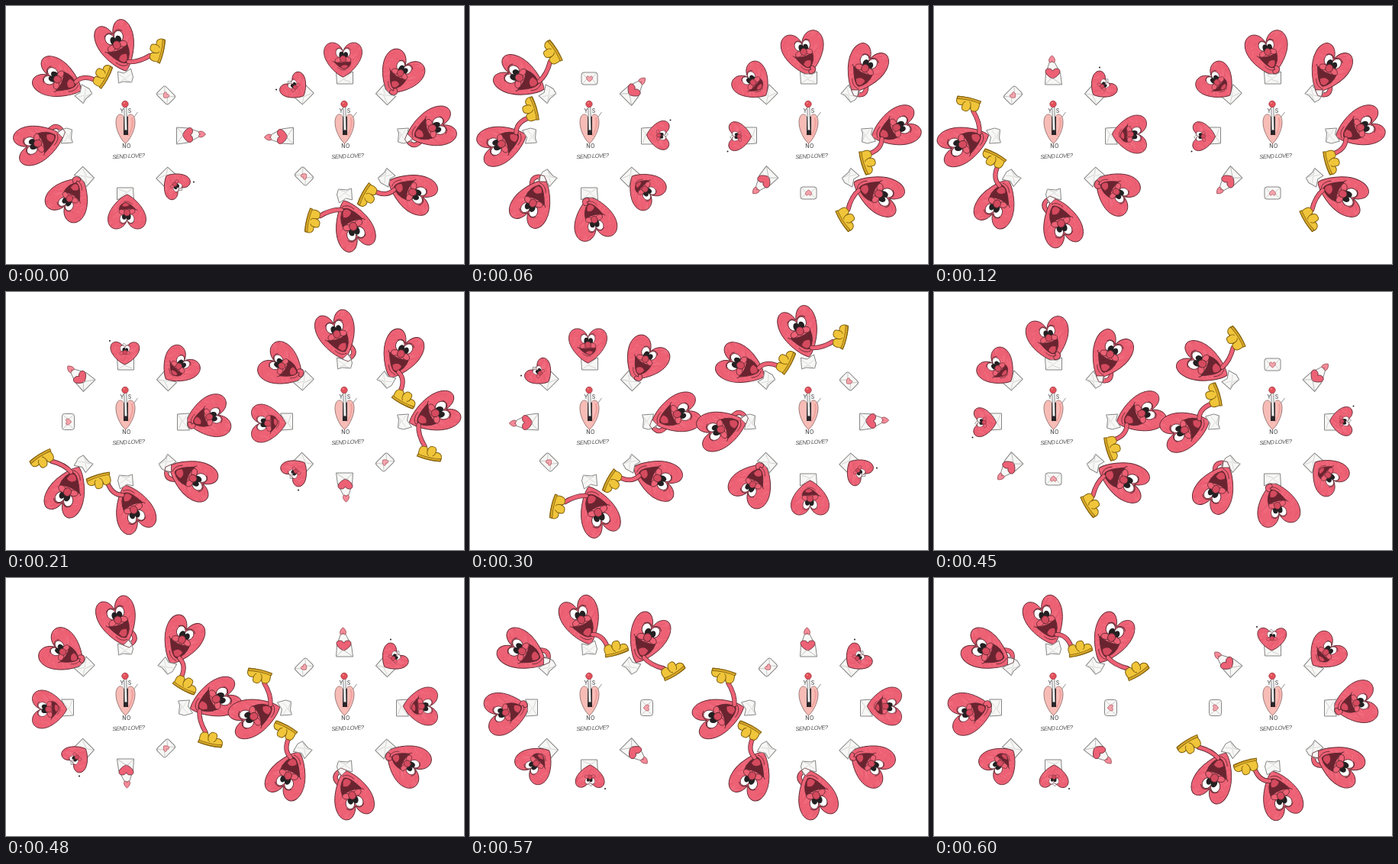
An HTML page with a canvas that plays this animation: 600 px wide and 338 px high, repeating every 630 ms.

```html
<!DOCTYPE html>
<html lang="en">
<head>
<meta charset="utf-8">
<title>Send love?</title>
<style>
html, body { margin: 0; width: 100%; height: 100%; overflow: hidden; background: #fff; }
canvas { display: block; width: 600px; height: 338px; }
</style>
</head>
<body>
<canvas id="stage" width="600" height="338"></canvas>
<script>
const ctx = document.getElementById('stage').getContext('2d');
const TAU = Math.PI * 2;
const FRAME = 30, LOOP = 630;
const INK = '#5f2932', RED = '#ed6175', DEEP = '#d44a5e', LIGHT = '#f88a98';
const GREY = '#858585', PAPER = '#f7f7f5', GOLD = '#80600f';

// Each disc turns back by one slot whenever its next start frame is reached.
const discs = [
  { x: 156.5, base: 0, starts: [1, 4, 7, 10, 13, 16, 19] },
  { x: 443.5, base: Math.PI, starts: [2, 5, 8, 10, 14, 16, 20] }
];

// Heart on each stage: tip, width, height, tilt in degrees, depth of the notch.
const hearts = {
  2: { x: -1, y: -75, w: 38, h: 30, tilt: 1, notch: .58 },
  3: { x: -2, y: -77, w: 50, h: 45, tilt: 0, notch: .74 },
  4: { x: 0, y: -80, w: 56, h: 56, tilt: -12, notch: .75 },
  5: { x: 0, y: -82, w: 51, h: 63, tilt: -17, notch: .77 },
  6: { x: 1, y: -83, w: 51, h: 63, tilt: -20, notch: .77 },
  7: { x: 1, y: -85, w: 50, h: 66, tilt: -20, notch: .77 }
};

function at(x, y, angle, draw) {
  ctx.save();
  ctx.translate(x, y);
  ctx.rotate(angle);
  draw();
  ctx.restore();
}

function paint(fill, stroke, width = 1) {
  if (fill) { ctx.fillStyle = fill; ctx.fill(); }
  if (stroke) { ctx.strokeStyle = stroke; ctx.lineWidth = width; ctx.stroke(); }
}

function poly(points, fill, stroke, width) {
  ctx.beginPath();
  points.forEach(([x, y]) => ctx.lineTo(x, y));
  ctx.closePath();
  paint(fill, stroke, width);
}

function line(points, stroke, width) {
  ctx.beginPath();
  points.forEach(([x, y]) => ctx.lineTo(x, y));
  paint(null, stroke, width);
}

function oval(x, y, rx, ry, fill, stroke, width, angle = 0) {
  ctx.beginPath();
  ctx.ellipse(x, y, rx, ry, angle, 0, TAU);
  paint(fill, stroke, width);
}

function curve(path, fill, stroke, width) {
  ctx.beginPath();
  ctx.moveTo(path[0], path[1]);
  for (let i = 2; i < path.length; i += 4) {
    ctx.quadraticCurveTo(path[i], path[i + 1], path[i + 2], path[i + 3]);
  }
  paint(fill, stroke, width);
}

function heartPath(w, h, notch = .76) {
  ctx.beginPath();
  ctx.moveTo(0, 0);
  ctx.bezierCurveTo(-.17 * w, -.07 * h, -.5 * w, -.42 * h, -.5 * w, -.72 * h);
  ctx.bezierCurveTo(-.5 * w, -1.08 * h, -.1 * w, -1.1 * h, 0, -notch * h);
  ctx.bezierCurveTo(.1 * w, -1.1 * h, .5 * w, -1.08 * h, .5 * w, -.72 * h);
  ctx.bezierCurveTo(.5 * w, -.42 * h, .17 * w, -.07 * h, 0, 0);
  ctx.closePath();
}

function plainHeart(x, y, w, h, angle, fill, stroke, width = .8) {
  at(x, y, angle, () => { heartPath(w, h); paint(fill, stroke, width); });
}

function crayon(w, h) {
  let seed = 7;
  const random = () => (seed = seed * 16807 % 2147483647) / 2147483647;
  ctx.save();
  ctx.clip();
  ctx.globalAlpha = .3;
  for (let i = 0; i < 50; i++) {
    const x = (random() - .5) * w, y = -random() * h;
    line([[x, y], [x + 3 + random() * 4, y - 3 - random() * 5]], i % 3 ? LIGHT : DEEP, 1.2);
  }
  ctx.restore();
}

function mouth(depth) {
  const y = part => -31 + part * depth;
  curve([-15, y(0), -2, y(.25), 13, y(-.05), 14, y(.6), 4, y(1), -4, y(1), -15, y(0)],
    '#6a2430', INK, 1);
  curve([-4, y(.65), 1, y(.3), 8, y(.5), 7, y(.9), 3, y(.92), -1, y(.95), -4, y(.65)], DEEP);
  curve([-18, y(-.1), -15, y(.08), -13, y(0)], null, INK, .9);
  curve([-9, y(.75), -4, y(1.2), 5, y(1.15)], null, INK, .8);
}

function face(stage, h) {
  const young = stage < 4;
  const scale = h / 66 * (young ? 1.15 : 1);
  ctx.save();
  ctx.translate(0, young ? h * .1 : 0);
  ctx.scale(scale, scale);
  if (stage > 2) mouth(young ? 12 : 21);
  oval(-6, -46, 6, 7.5, '#fff', INK, .9, -.2);
  oval(6, -46, 6, 7.5, '#fff', INK, .9, .2);
  oval(-2.5, -42.5, 4, 5.5, '#242022');
  oval(4.5, -42.5, 3.8, 5, '#242022');
  curve([-12, -51, -7, -57, -1, -52], null, INK, .9);
  curve([1, -52, 8, -58, 13, -51], null, INK, .9);
  oval(-8, -34, 5.5, 4, RED, INK, .8, -.3);
  oval(8, -35, 5.5, 4, RED, INK, .8, .3);
  oval(0, -36, 5, 5.5, DEEP, INK, .9);
  ctx.restore();
}

function character(stage) {
  const { x, y, w, h, tilt, notch } = hearts[stage];
  at(x, y, tilt * Math.PI / 180, () => {
    heartPath(w, h, notch);
    paint(RED);
    crayon(w, h);
    heartPath(w, h, notch);
    paint(null, INK, .9);
    face(stage, h);
  });
}

function limb(path) {
  ctx.lineCap = 'round';
  curve(path, null, INK, 6.2);
  curve(path, null, RED, 4.6);
  ctx.lineCap = 'butt';
}

function glove(x, y, angle) {
  at(x, y, angle, () => {
    curve([-14, 7, -17, -7, -9, -7, -4, -8, -4, -2, -3, -10, 3, -9,
      8, -9, 7, -2, 12, -4, 15, 0, 17, 4, 15, 8, 0, 10, -14, 7], '#f0c53a', GOLD, 1);
    curve([-16, 6, 0, 9, 16, 6], null, GOLD, 4);
    curve([-15, 6, 0, 8.5, 15, 6], null, '#d8a82a', 2.2);
    curve([-4, -2, -4, 3, -1, 4], null, GOLD, .9);
    curve([7, -2, 7, 2, 4, 3], null, GOLD, .9);
  });
}

function closedLetter() {
  ctx.beginPath();
  ctx.roundRect(-10.5, -83, 21, 16, 3);
  paint(PAPER, GREY);
  line([[-9, -68], [-3, -75], [-9, -82]], '#bbb', .7);
  line([[9, -68], [3, -75], [9, -82]], '#bbb', .7);
  plainHeart(0, -71, 8, 7, 0, '#f6a5ac', '#a95d66', .8);
}

function openingLetter() {
  poly([[-11, -67], [11, -67], [9, -82], [1, -97], [-5, -97], [-10, -82]], PAPER, GREY);
  line([[-10, -82], [-3, -75], [9, -82]], '#bbb', .7);
  plainHeart(-1, -75, 19, 13, 0, RED, INK);
  line([[-11, -67], [-2, -76], [11, -67]], '#aaa', .7);
  plainHeart(-2, -105, 8, 9, Math.PI, LIGHT, '#8f4650');
}

function openLetter(stage) {
  const corners = stage < 5
    ? [[-11, -84], [-5, -81], [5, -81], [11, -84], [11, -68], [-10, -68]]
    : [[-10, -84], [-2, -82], [7, -88], [10, -77], [8, -70], [-3, -71], [-9, -69]];
  poly(corners, PAPER, GREY);
  line([[-9, -69], [-2, -74], [9, -70]], '#c4c4c4', .7);
  line([[-8, -80], [0, -75], [7, -81]], '#d0d0d0', .7);
}

function emerging(stage) {
  if (stage === 2) {
    poly([[-7, -86], [-5, -100], [-2, -103], [1, -100], [4, -86]], PAPER, GREY, .8);
    oval(-20.5, -106, 1, 1, '#222');
  }
  openLetter(stage);
  character(stage);
}

function drawStage(stage) {
  if (stage === 0) return closedLetter();
  if (stage === 1) return openingLetter();
  if (stage < 4) return emerging(stage);
  if (stage === 5) limb([8, -99, 15, -92, 10, -86, 8, -83, 3, -84]);
  character(stage);
  if (stage === 6) limb([4, -96, 17, -96, 23, -81]);
  if (stage === 7) limb([4, -97, 17, -96, 32, -105]);
  openLetter(stage);
  if (stage === 4) limb([5, -89, 9, -86, 3, -84]);
  if (stage === 5) poly([[-3, -82], [4, -89], [9, -82], [5, -79]], PAPER, INK, .8);
  if (stage === 6) glove(34, -78, -.3);
  if (stage === 7) glove(41, -112, -Math.PI / 2 + .22);
}

function label(text, x, y, font, spacing, angle = 0) {
  at(x, y, angle, () => {
    ctx.font = font;
    ctx.letterSpacing = spacing;
    ctx.textAlign = 'center';
    ctx.textBaseline = 'middle';
    ctx.fillStyle = '#4e4e4e';
    ctx.fillText(text, 0, 0);
  });
}

function lever(x) {
  const caps = '500 7px Inter, sans-serif';
  at(x, 0, 0, () => {
    label('Y', -4.5, 137.5, caps, '0px');
    label('S', 5.5, 137.5, caps, '0px');
    label('NO', 1.5, 184, caps, '0.3px');
    label('SEND LOVE?', 4, 197, 'italic 7.5px "Liberation Sans", sans-serif', '-0.5px', -.05);
    line([[7, 151], [16, 139]], '#aaa', 1.2);
    plainHeart(0, 180, 25, 38, 0, '#f7bcb6', '#967170', .9);
    curve([8, 146, 12, 155, 4, 170], null, '#f0a09d', 2);
    ctx.fillStyle = '#2a2629';
    ctx.fillRect(-2.5, 145, 6, 24);
    line([[-.2, 130], [.5, 163]], '#777', 4);
    line([[-.2, 130], [.5, 162]], '#f1f1f1', 2.3);
    oval(-.5, 128.5, 4.2, 4.2, '#e4505a', '#9c3a45', .8);
    oval(-1.7, 127, 1, 1, '#f58d8d');
  });
}

function draw(now) {
  const frame = Math.floor(now % LOOP / FRAME);
  ctx.fillStyle = '#fff';
  ctx.fillRect(0, 0, 600, 338);
  ctx.lineJoin = 'round';
  for (const disc of discs) {
    const turn = disc.starts.filter(start => start <= frame).length;
    lever(disc.x);
    for (let stage = 0; stage < 8; stage++) {
      at(disc.x, 170, disc.base + (stage + 1 - turn) * TAU / 8, () => drawStage(stage));
    }
  }
}

function tick() {
  draw(performance.now());
  requestAnimationFrame(tick);
}
tick();
</script>
</body>
</html>
```
